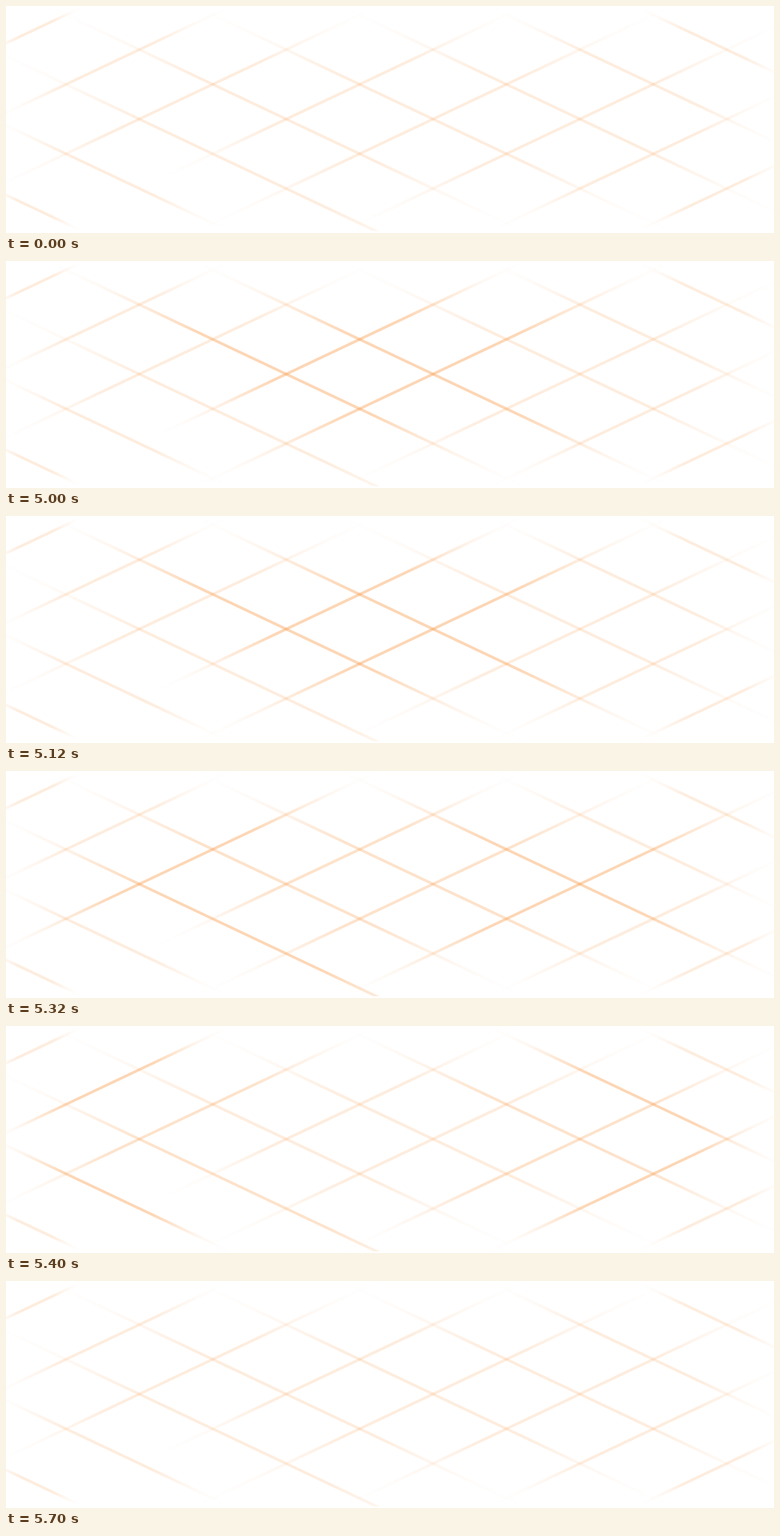
An HTML page with a canvas that plays this animation: 910 by 270 pixels, repeating every 5.8 s.

```html
<!DOCTYPE html>
<html lang="en">
<head>
<meta charset="utf-8">
<title>Pulsing lattice</title>
<style>
html, body { margin: 0; width: 100%; height: 100%; overflow: hidden; background: #fff; }
canvas { display: block; }
</style>
</head>
<body>
<canvas id="stage" width="910" height="270"></canvas>
<script>
const ctx = document.getElementById('stage').getContext('2d');
const LOOP = 5800, PULSE = 5000, STEP = 200, END = 5700;
const MID_Y = 134.5, SLOPE = 0.475, FIRST = -190, GAP = 174, COUNT = 8;
const LEFT = -20, RIGHT = 930, REACH = 280;
const BASE = 0.19;

// Each line spans the stage height, cut off at the sides.
function makeLine(i, dir) {
  const center = FIRST + i * GAP;
  return {
    center, dir,
    ring: i < COUNT / 2 ? COUNT / 2 - 1 - i : i - COUNT / 2,
    from: Math.max(LEFT, center - REACH),
    to: Math.min(RIGHT, center + REACH)
  };
}

const falling = Array.from({ length: COUNT }, (_, i) => makeLine(i, 1));
const rising = Array.from({ length: COUNT }, (_, i) => makeLine(i, -1));
falling[2].to = 560;   // still bright where it leaves the stage
rising[3].from = 180;  // starts well inside the stage
const lines = [...falling, ...rising];

// A ring flares as the pulse reaches it, then dims over two steps.
function strength(ring, step) {
  if (ring > 2) return BASE;
  return { 0: 0.41, 1: 0.29 }[step - ring] ?? BASE;
}

function drawLine({ center, dir, ring, from, to }, step) {
  const y = x => MID_Y + dir * SLOPE * (x - center);
  const fade = ctx.createLinearGradient(from, y(from), to, y(to));
  const peak = strength(ring, step);
  for (let s = 0; s <= 1; s += 0.0625) {
    const envelope = Math.min(1, 1.4 * Math.sin(Math.PI * s) ** 2);
    fade.addColorStop(s, `rgba(248,155,74,${(peak * envelope).toFixed(4)})`);
  }
  ctx.strokeStyle = fade;
  ctx.beginPath();
  ctx.moveTo(from, y(from));
  ctx.lineTo(to, y(to));
  ctx.stroke();
}

function draw(now) {
  const t = now % LOOP;
  const step = t < PULSE || t >= END ? -1 : Math.floor((t - PULSE) / STEP);
  ctx.clearRect(0, 0, 910, 270);
  lines.forEach(line => drawLine(line, step));
}

ctx.lineWidth = 3.2;
ctx.beginPath();
ctx.rect(0, 2, 910, 265.5);
ctx.clip();

let start;
function tick(now) {
  start ??= now;
  draw(now - start);
  requestAnimationFrame(tick);
}
requestAnimationFrame(tick);
</script>
</body>
</html>
```
